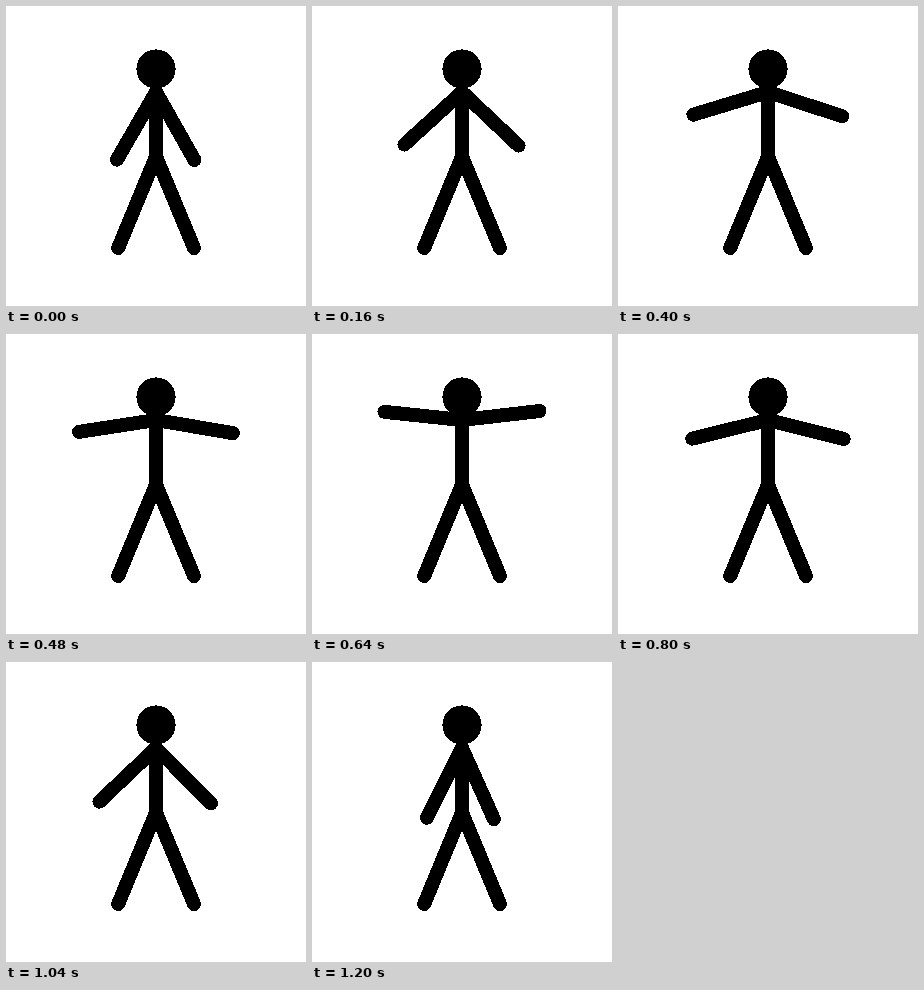
An HTML page that plays this animation: 300 px wide and 300 px high, repeating every 1.28 s.

```html
<!DOCTYPE html>
<html>
<head>
<meta charset="utf-8">
<style>
html, body { margin: 0; width: 100%; height: 100%; overflow: hidden; background: #fff; }
svg { display: block; width: 100%; height: 100%; shape-rendering: crispEdges; }
path { fill: none; stroke: #000; stroke-width: 14; stroke-linecap: round; }
</style>
</head>
<body>
<svg viewBox="0 0 300 300">
  <circle cx="150" cy="63" r="19.6"/>
  <path d="M150 86V150M112.2 242L150 150.5L188 242"/>
  <path id="arms"/>
</svg>
<script>
const STEP = 80, COUNT = 16, TOP = 8, REACH = 78;
const arms = document.getElementById('arms');

// Degrees below horizontal; the rise eases out, the fall is even.
const left = { dir: -1, low: 60, high: -6, fall: 9.9, ease: 1.08 };
const right = { dir: 1, low: 60.5, high: -6.6, fall: 10.35, ease: 1.02 };

function hand(arm, step) {
  const { dir, low, high, fall, ease } = arm;
  const deg = step < TOP
    ? high + (low - high) * (1 - step / TOP) ** ease
    : high + fall * (step - TOP);
  const a = deg * Math.PI / 180;
  return `${150 + dir * REACH * Math.cos(a)} ${86 + REACH * Math.sin(a)}`;
}

function draw(time) {
  const step = Math.floor(time / STEP) % COUNT;
  arms.setAttribute('d', `M${hand(left, step)}L150 86L${hand(right, step)}`);
}

const start = performance.now();
function tick() {
  draw(performance.now() - start);
  requestAnimationFrame(tick);
}
tick();
</script>
</body>
</html>
```
